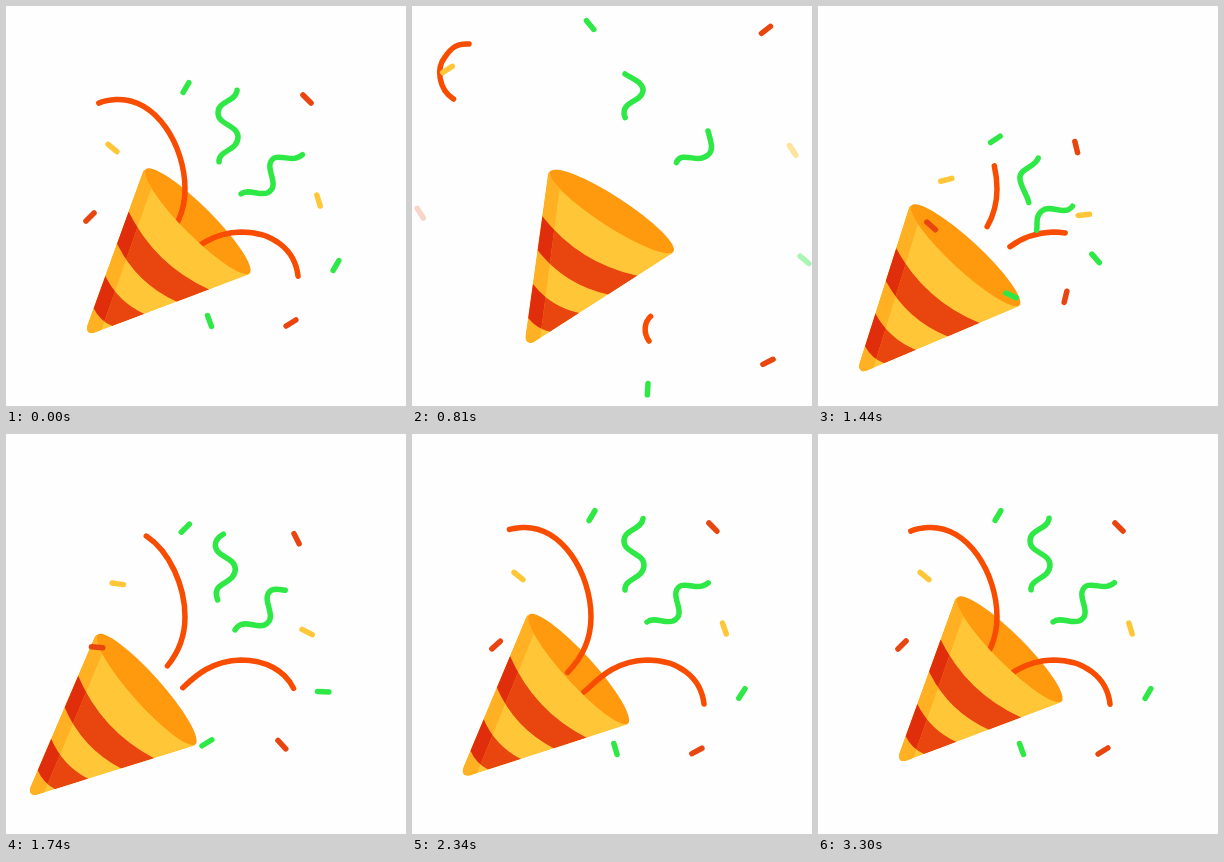
Recreate the animation shown at these times as an HTML page. Size 400 by 400 pixels, loop 5.33 s.

```html
<!DOCTYPE html>
<html lang="en">
<head>
<meta charset="utf-8">
<title>Party popper</title>
<style>
  html, body { margin: 0; width: 100%; height: 100%; overflow: hidden; background: #fefefe; }
  svg { display: block; width: 100%; height: 100%; }
  .line { fill: none; stroke-width: 5.5; stroke-linecap: round; stroke-linejoin: round; }
</style>
</head>
<body>
<svg viewBox="0 0 400 400">
  <defs>
    <path id="cone" d="M139.6 163.4A73.6 15 45 0 0 243.6 267.4Q243.4 268.4 241 269.3L88.5 326.8Q82 328.8 80.9 323.5Q80.6 321.5 81.4 319L136.6 166.5Q137.6 163.4 139.6 163.4Z"/>
    <path id="stripes"/>
    <clipPath id="coneClip"><use href="#cone"/></clipPath>
    <clipPath id="shadeClip"><path d="M151 166L95 325L70 340L70 150Z"/></clipPath>
  </defs>
  <g id="mouth"><ellipse cx="191.5" cy="215.5" rx="73.6" ry="15.2" transform="rotate(45 191.5 215.5)" fill="#ff9a0f"/></g>
  <g id="ribbons"></g>
  <g id="front" clip-path="url(#coneClip)">
    <use href="#cone" fill="#ffc738"/>
    <use href="#stripes" fill="#e8450f"/>
    <g clip-path="url(#shadeClip)">
      <use href="#cone" fill="#ffb023"/>
      <use href="#stripes" fill="#e02d0b"/>
    </g>
  </g>
  <g id="leaving"></g>
  <g id="arriving"></g>
</svg>
<script>
const LOOP = 5330, STEP = 30, LAST = 3300;
const RECOIL = 1170, BURST = 1230, KICK = 1530, SETTLE = 3090;
const GREEN = '#2ee845', RED = '#e8450f', YELLOW = '#ffc738', ORANGE = '#f84c00';

const $ = id => document.getElementById(id);
const clamp = v => Math.max(0, Math.min(1, v));
const mix = (a, b, k) => a + (b - a) * k;
const sway = u => (1 - Math.cos(Math.PI * clamp(u))) / 2;
const easeOut = (u, power) => 1 - (1 - clamp(u)) ** power;
const rise = (t, span = 1600) => easeOut((t - BURST) / span, 5.8);

function addPath(parent, d, stroke) {
  const el = document.createElementNS('http://www.w3.org/2000/svg', 'path');
  el.setAttribute('d', d);
  el.setAttribute('class', 'line');
  el.setAttribute('stroke', stroke);
  return parent.appendChild(el);
}

// Two evenly spaced bands between the cone's sides, curved like its lip.
function stripePath() {
  const edge = i => {
    const k = 0.24 + 0.195 * i;
    const x0 = mix(137, 77.2, k), y0 = mix(166, 331, k);
    const x1 = mix(243, 77.2, k), y1 = mix(268.6, 331, k);
    const bow = 0.18;
    return {
      a: `${x0} ${y0}`, b: `${x1} ${y1}`,
      q: `${(x0 + x1) / 2 - bow * (y1 - y0)} ${(y0 + y1) / 2 + bow * (x1 - x0)}`
    };
  };
  return [0, 2].map(i => {
    const top = edge(i), low = edge(i + 1);
    return `M${top.a}Q${top.q} ${top.b}L${low.b}Q${low.q} ${low.a}Z`;
  }).join('');
}
$('stripes').setAttribute('d', stripePath());

// The cone winds up, recoils, then drifts back with a slight lean.
const rest = [191.5, 215.5, 0], wound = [202, 203, -15.3], kicked = [138, 257.5, 0];
function conePose(t) {
  const blend = (a, b, k) => a.map((v, i) => mix(v, b[i], k));
  if (t < RECOIL) return blend(rest, wound, sway(t / RECOIL));
  if (t < KICK) return blend(wound, kicked, sway((t - RECOIL) / (KICK - RECOIL)));
  const u = clamp((t - KICK) / (SETTLE - KICK));
  const [x, y] = blend(kicked, rest, sway(u));
  return [x, y, 3.6 * Math.sin(Math.PI * Math.sqrt(u))];
}

// A ribbon slides along one curve: lead-in, the part shown at rest, and the way out.
function ribbon({ color, lead, shown, exit, gone, span, slack = 0, shift = [0, 0] }) {
  const el = addPath($('ribbons'), lead, color);
  const measure = d => { el.setAttribute('d', d); return el.getTotalLength(); };
  const restTail = measure(lead), restHead = measure(lead + shown), end = measure(lead + shown + exit);
  return t => {
    const out = t < BURST, k = out ? 1 : rise(t, span);
    const head = out ? mix(restHead, end, sway(t / 600)) : restHead * k;
    const tail = out ? mix(restTail, end, clamp(t / gone) ** 2) : mix(slack, restTail, k);
    el.style.display = head - tail > 0.5 ? '' : 'none';
    el.setAttribute('stroke-dasharray', `${Math.max(head - tail, 0.1)} 2000`);
    el.setAttribute('stroke-dashoffset', -tail);
    el.setAttribute('transform', `translate(${shift.map(v => v * (1 - k))})`);
  };
}

const squiggle = { color: GREEN, gone: 1150, shift: [-25, 38] };
const ribbons = [
  {
    color: ORANGE, gone: 923, span: 2350, slack: 40,
    lead: 'M155 239',
    shown: 'C165 229 179 211 179 183C179 140 150 91 110 93.5Q100 94 93 97',
    exit: 'C76 103 57 104 43 94C26 84 24 62 33 51C39 42 45 37 57 38'
  },
  {
    color: ORANGE, gone: 857, slack: 60,
    lead: 'M172 258',
    shown: 'C184 248 200 227 235 226C266 226 289 243 292 270',
    exit: 'C294 298 277 303 255 304C235 305 228 322 237 335'
  },
  {
    ...squiggle,
    lead: 'M205 205C204 195 222 190 222 182C222 174 214 166 213 156',
    shown: 'C212 144 232 145 232 131C232 119 212 119 212 107C212 95 229 96 231 85',
    exit: 'C232 77 221 73 213 68'
  },
  {
    ...squiggle,
    lead: 'M222 232C222 220 229 217 230 205C230 196 230 192 235 188',
    shown: 'C242 182 253 190 261 187C274 181 262 167 264 158C267 145 283 155 290 152Q294 151 296 149',
    exit: 'C302 144 299 136 296 125'
  }
].map(ribbon);

// Confetti: colour, resting place and angle, far place, spin on the way there
const centre = [172, 238];
const confetti = [
  [GREEN, 180, 81.5, -60, 178, 15.5, -91],
  [RED, 301, 93, 45, 357, 20, -108],
  [YELLOW, 106.5, 142, 40, 31.5, 59, -95],
  [RED, 84, 211, -45, 4, 207, -100],
  [YELLOW, 312.5, 194.5, 73, 384.5, 141.5, -21],
  [GREEN, 330, 259.5, -60, 396, 253.5, -104],
  [GREEN, 203.5, 315, 70, 237.5, 387, 30],
  [RED, 285, 317, -32, 360, 358, 7]
].map(([color, x, y, angle, farX, farY, spin]) => {
  const piece = id => addPath($(id), 'M-5.7 0H5.7', color);
  const place = (el, px, py, a, alpha) => {
    el.setAttribute('transform', `translate(${px} ${py}) rotate(${a})`);
    el.setAttribute('opacity', alpha);
  };
  const old = piece('leaving'), fresh = piece('arriving');
  const fadeEnd = 790 + 3.4 * Math.abs(y - 230);
  const roll = 0.62 * (y - 25) * (color === YELLOW ? -1 : 1);
  return t => {
    const go = easeOut(t / 1300, 3), turn = easeOut(t / 1300, 1.5);
    place(old, mix(x, farX, go), mix(y, farY, go), angle + spin * turn, clamp((fadeEnd - t) / 200));
    const inward = 0.75 * (1 - rise(t)), unroll = 1 - easeOut((t - BURST) / 1200, 1.5);
    place(fresh, mix(x, centre[0], inward), mix(y, centre[1], inward), angle + roll * unroll, t < BURST ? 0 : 1);
  };
});

function draw(t) {
  const [x, y, turn] = conePose(t);
  const pose = `translate(${x} ${y}) rotate(${turn}) translate(${-rest[0]} ${-rest[1]})`;
  $('mouth').setAttribute('transform', pose);
  $('front').setAttribute('transform', pose);
  // New confetti starts inside the cone, then passes in front of it.
  if (t < 1440) $('front').before($('arriving'));
  else $('leaving').after($('arriving'));
  ribbons.forEach(update => update(t));
  confetti.forEach(update => update(t));
}

const start = performance.now();
function tick() {
  const t = (performance.now() - start) % LOOP;
  draw(Math.min(LAST, Math.floor(t / STEP) * STEP));
  requestAnimationFrame(tick);
}
tick();
</script>
</body>
</html>
```
